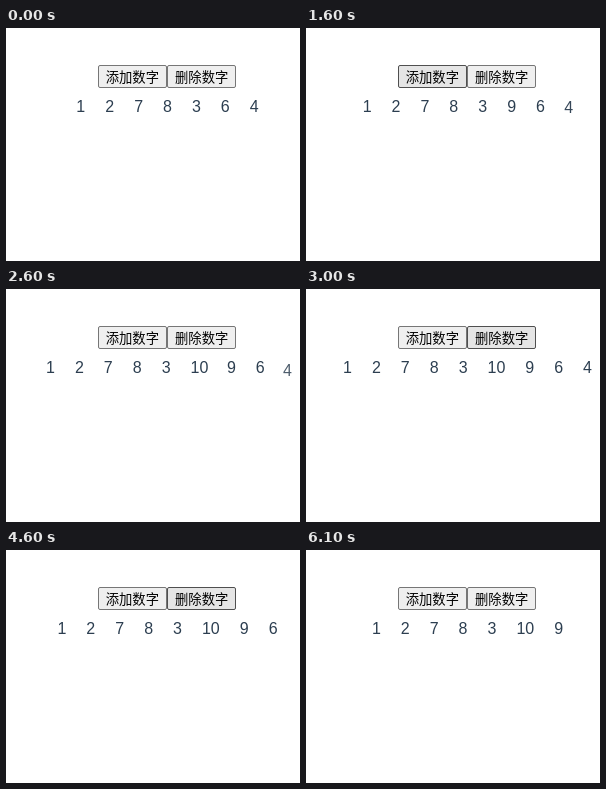
Animation, 294 px wide and 233 px high, one loop 6.8 s. Source, as an HTML page:

```html
<!DOCTYPE html>
<html lang="zh-CN">
<head>
<meta charset="utf-8">
<style>
html, body { margin: 0; width: 100%; height: 100%; overflow: hidden; background: #fff; }
button {
  position: absolute; top: 37px; box-sizing: border-box; width: 69.33px; height: 23px;
  margin: 0; padding: 0; border: 1px solid #767676; border-radius: 2px;
  background: #efefef; color: #000; white-space: nowrap; pointer-events: none;
  font: 13.333px/21px "Noto Sans CJK SC", "Noto Sans CJK", sans-serif;
}
button.hover { background: #e5e5e5; border-color: #4f4f4f; }
button.press { background: #f5f5f5; border-color: #8d8d8d; }
#add { left: 91.67px; }
#remove { left: 161px; }
span {
  position: absolute; left: 0; top: 70px; color: #2c3e50;
  font: 16px/18px "Liberation Sans", Arial, sans-serif;
}
</style>
</head>
<body>
<button id="add">添加数字</button><button id="remove">删除数字</button>
<script>
const LOOP = 6800, STEP = 100, MOVE = 1000;
const CENTER = 161.5, GAP = 10, DIGIT = 8.9, DROP = 20;

// Lists over time; "start" is when the one-second transition begins.
const states = [
  { at: 0, list: [1, 2, 7, 8, 3, 6, 4] },
  { at: 900, start: 880, enter: true, list: [1, 2, 7, 8, 3, 9, 6, 4] },
  { at: 2100, start: 2060, enter: true, list: [1, 2, 7, 8, 3, 10, 9, 6, 4] },
  { at: 3600, start: 3550, leave: true, list: [1, 2, 7, 8, 3, 10, 9, 6, 4] },
  { at: 4600, list: [1, 2, 7, 8, 3, 10, 9, 6] },
  { at: 5100, start: 5050, leave: true, list: [1, 2, 7, 8, 3, 10, 9, 6] },
  { at: 6100, list: [1, 2, 7, 8, 3, 10, 9] }
];
const buttonStates = {
  add: [[0, ''], [400, 'hover'], [2000, 'press'], [2100, 'hover'], [2500, '']],
  remove: [[0, ''], [2700, 'hover'], [3500, 'press'], [3600, 'hover'],
           [5000, 'press'], [5100, 'hover'], [6100, '']]
};

// CSS "ease": cubic-bezier(.25, .1, .25, 1)
function ease(x) {
  if (x <= 0) return 0;
  if (x >= 1) return 1;
  const bezier = (u, a, b) => 3 * u * (1 - u) ** 2 * a + 3 * u * u * (1 - u) * b + u ** 3;
  let low = 0, high = 1;
  for (let i = 0; i < 24; i++) {
    const mid = (low + high) / 2;
    if (bezier(mid, .25, .25) < x) low = mid; else high = mid;
  }
  return bezier(low, .1, 1);
}

function layout(list) {
  const widths = list.map(n => String(n).length * DIGIT + 2 * GAP);
  let x = CENTER - widths.reduce((a, b) => a + b) / 2 + GAP;
  return widths.map(w => (x += w) - w);
}

const spans = Array.from({ length: 9 }, () => document.body.appendChild(document.createElement('span')));

function draw(time) {
  const index = states.findLastIndex(s => s.at <= time);
  const state = states[index];
  const p = state.start ? ease((time - state.start) / MOVE) : 1;
  const target = layout(state.list);
  const from = state.enter ? layout(states[index - 1].list) : target;
  const last = state.list.length - 1;

  spans.forEach((span, i) => {
    span.hidden = i > last;
    if (span.hidden) return;
    const start = from[i] ?? target[i];
    const x = start + (target[i] - start) * p;
    let shown = 1;
    if (i === last && state.enter) shown = p;
    if (i === last && state.leave) shown = 1 - p;
    span.textContent = state.list[i];
    span.style.opacity = shown < .1 ? 0 : shown;
    span.style.transform = `translate(${x}px, ${DROP * (1 - shown)}px)`;
  });

  for (const id in buttonStates)
    document.getElementById(id).className = buttonStates[id].findLast(s => s[0] <= time)[1];
}

const origin = performance.now();
function tick() {
  const time = (performance.now() - origin) % LOOP;
  draw(Math.floor(time / STEP) * STEP);
  requestAnimationFrame(tick);
}
tick();
</script>
</body>
</html>
```
